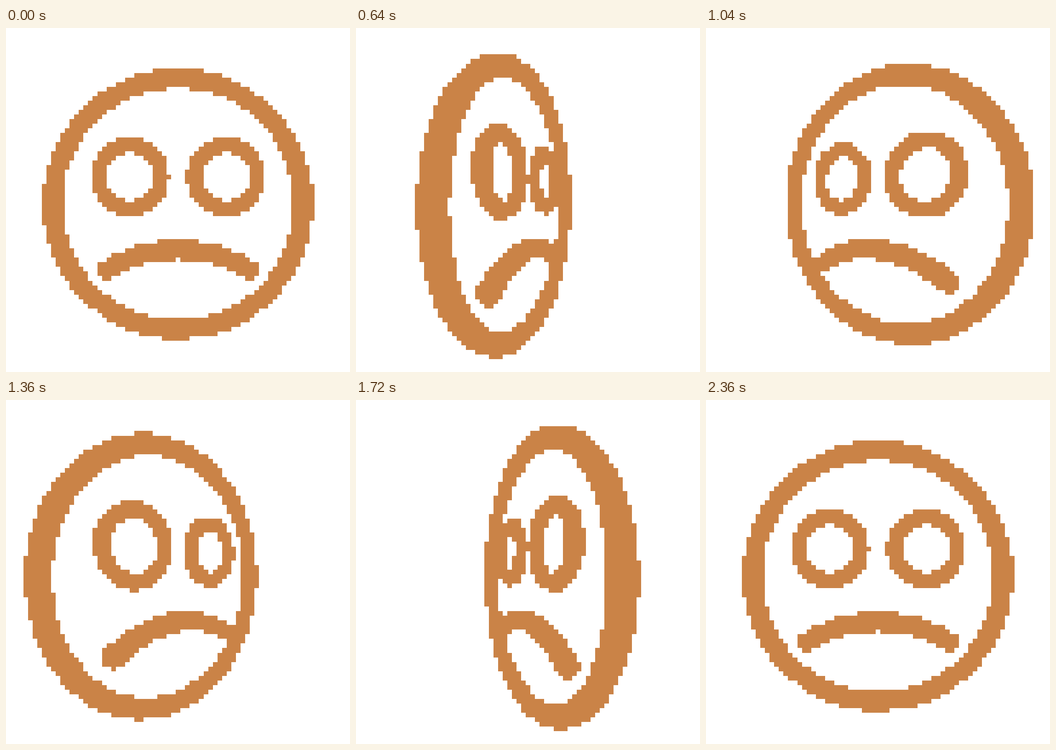
These frames come from a looping animation (748x748 px, 2440 ms). An HTML page with a canvas:

```html
<!DOCTYPE html>
<html lang="en">
<head>
<meta charset="utf-8">
<title>Spinning sad face</title>
<style>
  html, body { margin: 0; width: 100%; height: 100%; overflow: hidden; background: #fff; }
  canvas { display: block; width: 100vw; height: 100vh; }
</style>
</head>
<body>
<canvas width="748" height="748"></canvas>
<script>
const ctx = document.querySelector('canvas').getContext('2d');
const STEP = 40, LOOP = 2440, LAST = 59;
const CELL = 10.043, LEFT = 7.7, TOP = 7.2, COUNT = 73;
const AXIS = 374.1, HORIZON = 374, DEPTH = 556;
const FLATTEN = 0.9; // depth of a tube relative to its width

// Tubes bent along arcs; x from the spin axis, y from the horizon.
const arc = (x, y, radius, tube, from = -Math.PI, to = Math.PI) => ({ x, y, radius, tube, from, to });
const face = [
  arc(0, 8.4, 272.5, 21.7),
  arc(-104.8, -49.8, 68.4, 16.9),
  arc(104.8, -49.8, 68.4, 16.9),
  arc(0, 401, 292.5, 21.7, -0.553, 0.553)
];

// One full turn, eased in and out.
function angle(i) {
  const u = i / LAST;
  return 2 * Math.PI * u * u * (3 - 2 * u);
}

// Fill the cells whose centres lie inside an ellipse.
function blot(cells, x, y, rx, ry) {
  const cx = (x - LEFT) / CELL - 0.5, cy = (y - TOP) / CELL - 0.5;
  const w = rx / CELL, h = ry / CELL;
  for (let row = Math.ceil(cy - h); row <= cy + h; row++) {
    const half = w * Math.sqrt(Math.max(0, 1 - ((row - cy) / h) ** 2));
    for (let col = Math.ceil(cx - half); col <= cx + half; col++) cells.add(row * COUNT + col);
  }
}

function draw(i) {
  const t = angle(i), cos = Math.cos(t), sin = Math.sin(t);
  const squash = Math.hypot(cos, FLATTEN * sin);
  const cells = new Set();
  for (const { x, y, radius, tube, from, to } of face) {
    const steps = Math.ceil(radius * (to - from) / 2);
    for (let k = 0; k <= steps; k++) {
      const a = from + (to - from) * k / steps;
      const px = x + radius * Math.sin(a), py = y - radius * Math.cos(a);
      const zoom = DEPTH / (DEPTH + px * sin);
      blot(cells, AXIS + px * cos * zoom, HORIZON + py * zoom, tube * zoom * squash, tube * zoom);
    }
  }
  const edge = (start, k) => Math.round(start + k * CELL);
  ctx.fillStyle = '#fff';
  ctx.fillRect(0, 0, 748, 748);
  ctx.fillStyle = '#ca8347';
  for (const cell of cells) {
    const col = cell % COUNT, row = Math.floor(cell / COUNT);
    const x = edge(LEFT, col), y = edge(TOP, row);
    ctx.fillRect(x, y, edge(LEFT, col + 1) - x, edge(TOP, row + 1) - y);
  }
}

let shown = -1;
const start = performance.now();
function tick() {
  const t = (performance.now() - start) % LOOP;
  const i = Math.min(LAST, Math.floor(t / STEP));
  if (i !== shown) draw(shown = i);
  requestAnimationFrame(tick);
}
tick();
</script>
</body>
</html>
```
